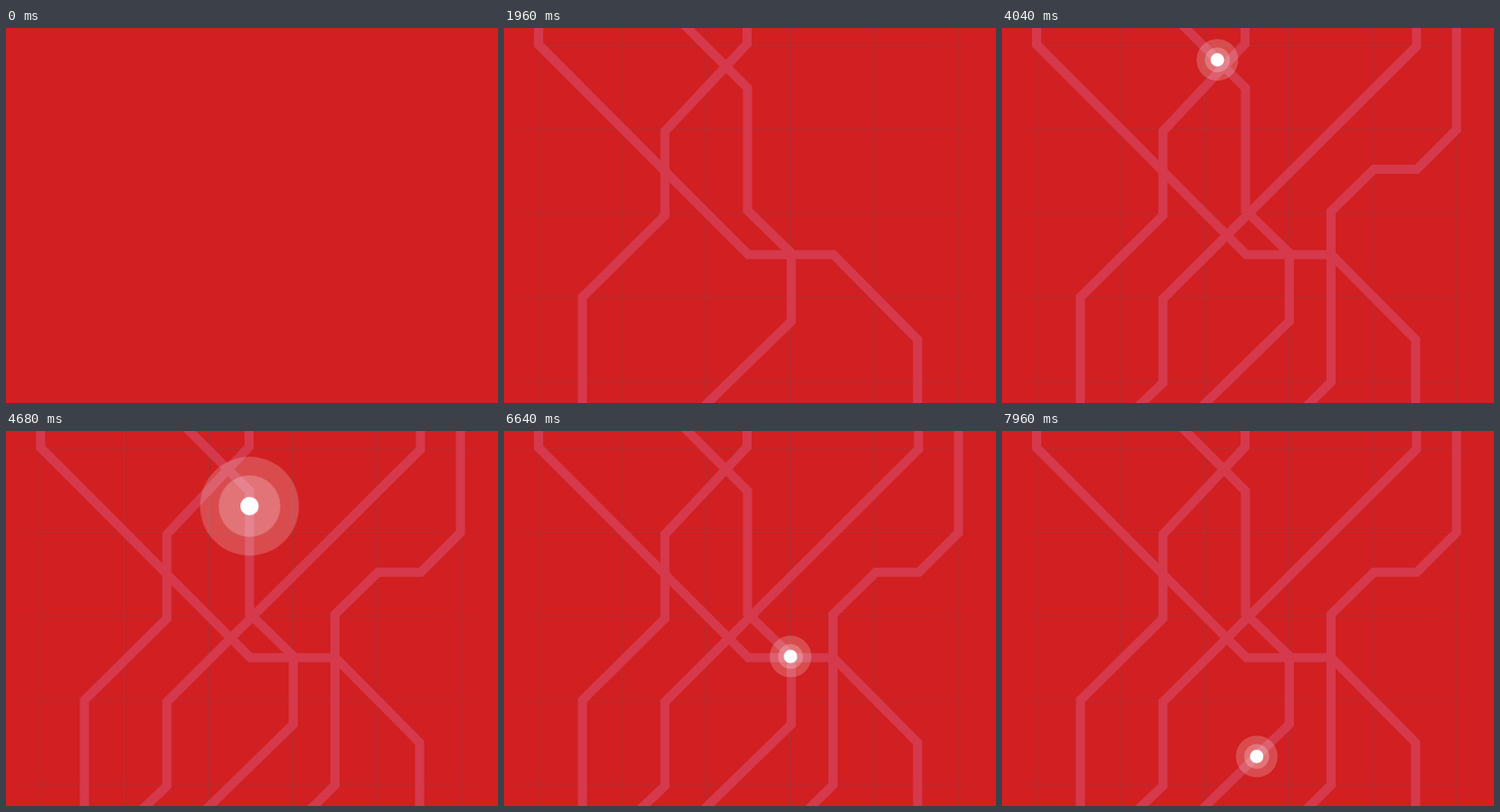
An HTML page for the animation above (8 s loop, 590 by 450 pixels).

```html
<!DOCTYPE html>
<html lang="en">
<head>
<meta charset="utf-8">
<title>Route map</title>
<style>
html, body { margin: 0; width: 100%; height: 100%; overflow: hidden; background: #d11f22; }
svg { display: block; width: 590px; height: 450px; }

.grid path, .route path, .marker, .marker circle { animation: 8s linear infinite; }

/* Grid: --d delays each line inside one shared sweep */
.grid { fill: none; stroke: #6b5a5a; stroke-opacity: .3; }
.grid path { stroke-dasharray: 3 3; animation-name: sweep; }
@keyframes sweep {
  0%, 2% { stroke-dashoffset: calc(3px + var(--d) * 1px); }
  17%, 100% { stroke-dashoffset: calc(1px + var(--d) * 1px); }
}

.route { fill: none; stroke: #d5394b; stroke-width: 11; }
.route path { stroke-dasharray: 1 2; animation-timing-function: ease-in-out; }
.early path { animation-name: early; }
.late path { animation-name: late; }
@keyframes early {
  0%, 8% { stroke-dashoffset: 1px; }
  24%, 100% { stroke-dashoffset: 0px; }
}
@keyframes late {
  0%, 25% { stroke-dashoffset: 1px; }
  41%, 100% { stroke-dashoffset: 0px; }
}

.marker { fill: #fff; animation-name: travel; }
@keyframes travel {
  0%, 37.56% { transform: translate(182.8px, -37.2px); }
  56.31% { transform: translate(292px, 72px); }
  74.15% { transform: translate(292px, 219px); }
  83.08% { transform: translate(344px, 271px); }
  92.9% { transform: translate(344px, 352px); }
  100% { transform: translate(302.6px, 393.4px); }
}
.marker circle { animation-name: pulse; animation-timing-function: cubic-bezier(.333, 0, .667, 1); }
@keyframes pulse {
  0%, 37.75%, 49.75%, 54%, 66%, 70.25%, 82.25%, 86.5%, 98.5%, 100% { transform: scale(1); }
  43.25%, 46%, 59.5%, 62.25%, 75.75%, 78.5%, 92%, 94.75% { transform: scale(var(--k)); }
}
</style>
</head>
<body>
<svg viewBox="0 0 590 450">
  <defs>
    <linearGradient id="fade" gradientUnits="userSpaceOnUse" x1="10" y1="0" x2="580" y2="0">
      <stop offset="0" stop-color="#6b5a5a" stop-opacity="0"/>
      <stop offset=".07" stop-color="#6b5a5a"/>
      <stop offset=".87" stop-color="#6b5a5a"/>
      <stop offset="1" stop-color="#6b5a5a" stop-opacity="0"/>
    </linearGradient>
  </defs>

  <g class="grid">
    <path pathLength="1" style="--d:0" d="M41 0V450"/>
    <path pathLength="1" style="--d:.2" d="M141.5 0V450"/>
    <path pathLength="1" style="--d:.4" d="M242.5 0V450"/>
    <path pathLength="1" style="--d:.6" d="M343.5 0V450"/>
    <path pathLength="1" style="--d:.8" d="M444 0V450"/>
    <path pathLength="1" style="--d:1" d="M545 0V450"/>
    <g stroke="url(#fade)">
      <path pathLength="1" style="--d:0" d="M10 21H580"/>
      <path pathLength="1" style="--d:.15" d="M10 121.5H580"/>
      <path pathLength="1" style="--d:.3" d="M10 222H580"/>
      <path pathLength="1" style="--d:.45" d="M10 323H580"/>
      <path pathLength="1" style="--d:.6" d="M10 424H580"/>
    </g>
  </g>

  <g class="route early">
    <path pathLength="1" d="M41.5 -6V20L293 272H395L496 374V456"/>
    <path pathLength="1" d="M291.5 -6V19L193 124V225L94 323V456"/>
    <path pathLength="1" d="M210 -10L292 72V219L344.5 270V352L237 457"/>
  </g>
  <g class="route late">
    <path pathLength="1" d="M497 -6V22L193 325V426L158 459"/>
    <path pathLength="1" d="M545 -6V122L497.5 169.5H446L394.5 220V425L361 458"/>
  </g>

  <g class="marker">
    <circle r="25" fill-opacity=".2" style="--k:2.5"/>
    <circle r="15" fill-opacity=".23" style="--k:2.6"/>
    <circle r="8" style="--k:1.4"/>
  </g>
</svg>
</body>
</html>
```
